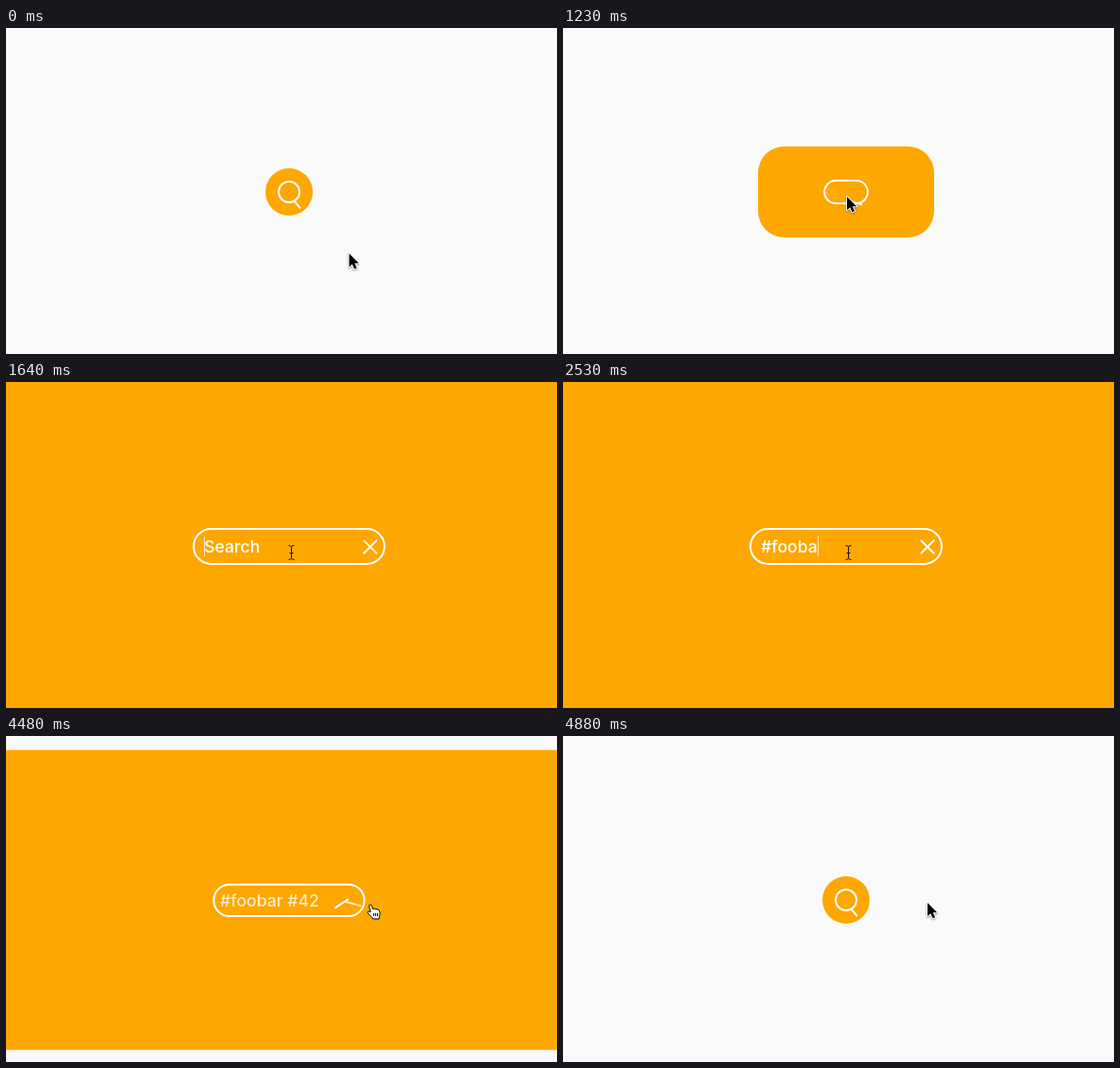
An HTML page with a canvas that plays this animation: 582x344 px, repeating every 4.98 s.

```html
<!DOCTYPE html>
<html lang="en">
<head>
<meta charset="utf-8">
<title>Expanding search field</title>
<style>
html, body { margin: 0; width: 100%; height: 100%; overflow: hidden; background: #fafafa; }
canvas { display: block; }
</style>
</head>
<body>
<canvas id="stage" width="582" height="344"></canvas>
<script>
const ctx = document.getElementById('stage').getContext('2d');
const LOOP = 4980, CX = 299, CY = 173;
const OPEN = 1169, OPEN_MS = 507, CLOSE = 4403, CLOSE_MS = 446;
const BEAM_ON = 1300, ARROW_BACK = 4690;
const QUERY = '#foobar #42';

const ARROW = new Path2D('M0 0V14.2L3.2 11.2L5.5 16.3L8 15.2L5.8 10.3H10.2Z');
const HAND = new Path2D('M4 8L2.6 2.2Q2.4 .6 3.7 .5Q5 .5 5.4 1.8L6.5 5.2Q7.8 4.2 8.8 5.3' +
  'Q10 4.4 11 5.7Q12.6 5 13.4 6.8Q14.8 9.5 13.6 12L13 15.5H6.8Q5.5 13 2.2 10.6Q.2 8.6 1.6 7.6Q2.6 7 4 8.6Z');
const FINGERS = new Path2D('M7.5 9.5V12.5M9.5 9.5V12.5M11.5 9.5V12.5');
const BEAM = new Path2D('M-3 -7.5Q0 -7.5 0 -5.5V5.5Q0 7.5 -3 7.5M3 -7.5Q0 -7.5 0 -5.5M0 5.5Q0 7.5 3 7.5M-2 .5H2');

const clamp = (v, lo = 0, hi = 1) => Math.max(lo, Math.min(hi, v));
const mix = (a, b, k) => a + (b - a) * k;

// cubic-bezier(.25, .1, .25, 1), solved by bisection
function ease(x) {
  let lo = 0, hi = 1, s = .5;
  for (let i = 0; i < 20; i++) {
    s = (lo + hi) / 2;
    if (.75 * s * (1 - s) + s ** 3 < x) lo = s; else hi = s;
  }
  return .3 * s * (1 - s) ** 2 + 3 * s * s * (1 - s) + s ** 3;
}

const progress = (t, start, ms) => ease(clamp((t - start) / ms));

function openness(t) {
  if (t <= OPEN || t >= CLOSE + CLOSE_MS) return 0;
  return progress(t, OPEN, OPEN_MS) - progress(t, CLOSE, CLOSE_MS);
}

// One key, then a quick word, then slow single keys
function typedCount(t) {
  if (t < 1930) return 0;
  return 1 + clamp(Math.floor((t - 2170) / 90) + 1, 0, 7) + clamp(Math.floor((t - 2770) / 360), 0, 3);
}

function mouse(t) {
  const a = progress(t, 500, 490), b = progress(t, 3580, 820);
  return [mix(362.5, 300, a) + 85 * b, mix(238, 178, a) - 2 * b];
}

function roundBox(cx, cy, w, h, r) {
  ctx.beginPath();
  ctx.roundRect(cx - w / 2, cy - h / 2, w, h, Math.min(r, w / 2, h / 2));
}

function drawLine(x, y, len, deg, alpha) {
  const a = deg * Math.PI / 180, dx = Math.cos(a) * len / 2, dy = Math.sin(a) * len / 2;
  ctx.globalAlpha = alpha;
  ctx.beginPath();
  ctx.moveTo(x - dx, y - dy);
  ctx.lineTo(x + dx, y + dy);
  ctx.stroke();
  ctx.globalAlpha = 1;
}

// The magnifier's handle swings into one bar of the cross; the other bar fades in late
function drawIcon(t, p, right) {
  const x = right + mix(-3.2, -16, p), y = mix(186.6, 174, p), len = mix(9.5, 20.5, p);
  drawLine(x - 18 * Math.sin(Math.PI * p), y, len, mix(50, -45, Math.sqrt(p)), 1);
  drawLine(x, y, len, mix(-80, 45, p), t < CLOSE ? clamp((t - 1400) / 300) : p);
}

function drawText(t, p, left, right) {
  const typed = QUERY.slice(0, typedCount(t));
  const x = left + mix(-7, 12, p);
  const width = s => ctx.measureText(s).width;
  ctx.save();
  ctx.beginPath();
  ctx.rect(left + 2, CY - 20, Math.max(0, right - left - 36), 40);
  ctx.clip();
  ctx.globalAlpha = p;
  ctx.fillStyle = '#fff';
  ctx.font = '500 17.6px Inter, sans-serif';
  ctx.fillText(typed || 'Search', x, 180);
  if (t < CLOSE) {
    if (t >= 2770) {
      ctx.strokeStyle = '#f0452c';
      ctx.lineWidth = 2.6;
      ctx.lineCap = 'round';
      ctx.setLineDash([0, 4]);
      ctx.beginPath();
      ctx.moveTo(x + width('#') + 1.5, 183);
      ctx.lineTo(x + width('#foobar'), 183);
      ctx.stroke();
    }
    ctx.globalAlpha = .75 * p;
    ctx.fillRect(Math.round(x + width(typed)), 163, 1, 21);
  }
  ctx.restore();
}

function drawCursor(t) {
  const [x, y] = mouse(t);
  const onButton = t < OPEN && Math.hypot(x - CX, y - CY) < 25;
  const editing = t >= BEAM_ON && t < ARROW_BACK;
  ctx.save();
  ctx.lineJoin = 'round';
  ctx.lineWidth = 1;
  if (onButton || editing && x > 374) {
    ctx.translate(x - 4, y + 1.5);
    ctx.fillStyle = '#fff';
    ctx.strokeStyle = '#000';
    ctx.fill(HAND);
    ctx.stroke(HAND);
    ctx.stroke(FINGERS);
  } else if (editing) {
    ctx.translate(Math.round(x) + 1.5, Math.round(y) + 2);
    ctx.strokeStyle = '#1c1400';
    ctx.stroke(BEAM);
  } else {
    ctx.translate(x, y);
    ctx.shadowColor = 'rgba(0,0,0,.4)';
    ctx.shadowBlur = 2;
    ctx.shadowOffsetY = 1;
    ctx.strokeStyle = '#fff';
    ctx.lineWidth = 2;
    ctx.stroke(ARROW);
    ctx.shadowColor = 'transparent';
    ctx.fillStyle = '#000';
    ctx.fill(ARROW);
  }
  ctx.restore();
}

function draw(t) {
  const p = openness(t);
  ctx.fillStyle = '#fafafa';
  ctx.fillRect(0, 0, 582, 344);
  ctx.fillStyle = '#fda700';
  roundBox(CX, CY, mix(50, 1080, p), mix(50, 400, p), 28);
  ctx.fill();

  const w = mix(24, 204, p), h = mix(24, 39, p);
  if (p > 0) drawText(t, p, CX - w / 2, CX + w / 2);
  ctx.strokeStyle = '#fff';
  ctx.lineWidth = 2;
  roundBox(CX, CY + p / 2, w - 2, h - 2, h);
  ctx.stroke();
  drawIcon(t, p, CX + w / 2);
  drawCursor(t);
}

const begin = performance.now();
function tick() {
  draw((performance.now() - begin) % LOOP);
  requestAnimationFrame(tick);
}
tick();
</script>
</body>
</html>
```
